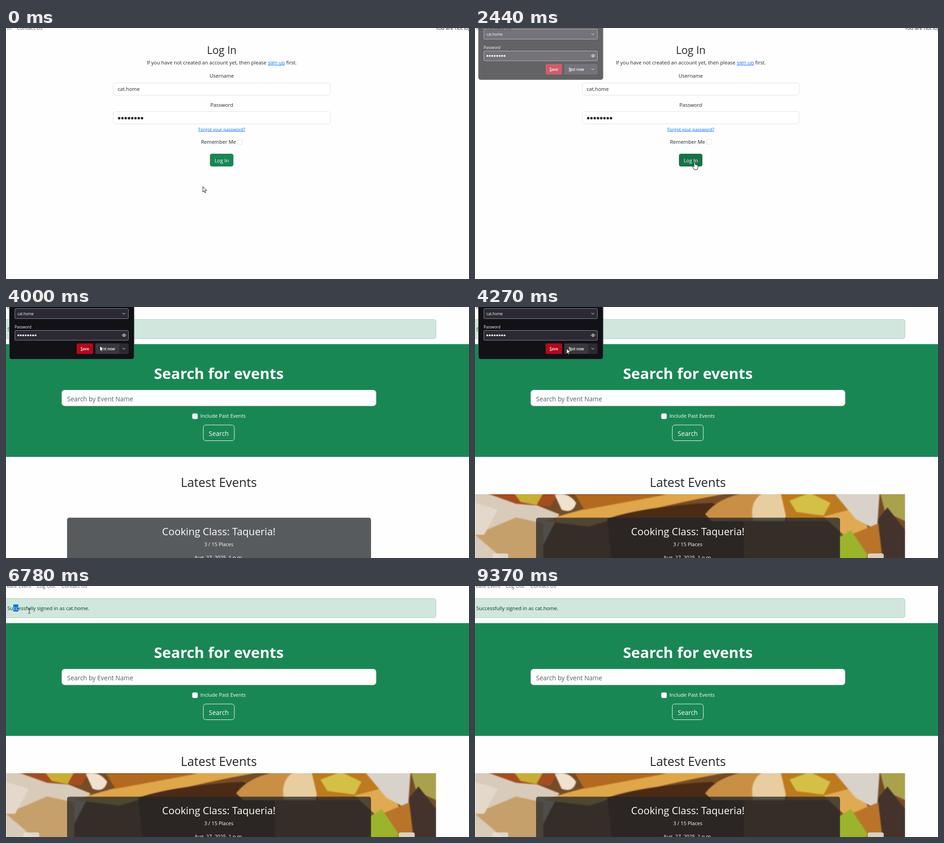
These frames come from a looping animation (1016 by 551 pixels, 9.87 s). An HTML page:

```html
<!DOCTYPE html>
<html lang="en">
<head>
<meta charset="utf-8">
<title>Log in walkthrough</title>
<style>
  html, body { margin: 0; width: 100%; height: 100%; overflow: hidden; background: #fefefe; }
  svg { display: block; width: 100%; height: 100%; font: 11.1px "Open Sans", "Noto Sans", sans-serif; fill: #212529; }
  .mid { text-anchor: middle; }
  .link { fill: #0d6efd; text-decoration: underline; }
  .nav { fill: #5c5d5f; }
  .field { fill: #fff; stroke: #dee2e6; }
  .white { fill: #fff; }
  .large { font-size: 13.95px; }
  #popup { font-size: 8.2px; fill: #fbfbfe; }
  #popup .box { fill: #2b2a33; stroke: #8f8f9d; }
  #popup .bold { font-weight: 600; }
  .icon { fill: none; stroke: #fbfbfe; }
  .underline { text-decoration: underline; }
  #photo { filter: blur(1.2px); }
  #cursor path { fill: #fff; stroke: #000; stroke-width: .9; stroke-linejoin: round; }
  #cursor #beam { fill: none; stroke: #222; stroke-width: 1; }
</style>
</head>
<body>
<svg viewBox="0 0 1016 551">
  <defs>
    <clipPath id="photoClip"><rect y="411" width="944" height="140"/></clipPath>
    <clipPath id="selectionClip"><rect class="selection" x="16" y="40.5" height="15.5"/></clipPath>
  </defs>

  <g id="login">
    <text class="nav" x="12" y="4" text-anchor="end">Log In</text>
    <text class="nav" x="24" y="4">Contact Us</text>
    <text x="943" y="4">You are not logged in</text>
    <text class="mid" x="473.5" y="56.5" font-size="23">Log In</text>
    <text class="mid" x="473.5" y="80">If you have not created an account yet, then please <tspan class="link">sign up</tspan> first.</text>
    <text class="mid" x="473.5" y="109">Username</text>
    <rect class="field" x="235.5" y="120.5" width="476" height="27" rx="4.5"/>
    <text x="245" y="138">cat.home</text>
    <text class="mid" x="473.5" y="172.5">Password</text>
    <rect class="field" x="235.5" y="183.5" width="476" height="27" rx="4.5"/>
    <g id="loginDots"></g>
    <text class="mid link" x="473.5" y="225.5" font-size="9.7">Forgot your password?</text>
    <text x="428" y="254">Remember Me</text>
    <rect class="field" x="507.5" y="244.5" width="11" height="11" rx="2.5"/>
    <rect id="loginButton" x="447.5" y="276" width="51.5" height="28" rx="4.5"/>
    <text class="mid white" x="473.5" y="294.5">Log In</text>
  </g>

  <g id="home">
    <text class="nav" x="56" y="4" text-anchor="end">Create Event</text>
    <text class="nav" x="68" y="4">Log Out</text>
    <text class="nav" x="122" y="4">Contact Us</text>
    <rect x="-20" y="27.5" width="963.5" height="42" rx="4.5" fill="#d1e7dd" stroke="#a3cfbb"/>
    <text x="3" y="52.5" fill="#0a3622">Successfully signed in as cat.home.</text>
    <rect class="selection" x="16" y="40.5" height="15.5" fill="#0078d7"/>
    <text class="white" x="3" y="52.5" clip-path="url(#selectionClip)">Successfully signed in as cat.home.</text>

    <rect y="81.5" width="1016" height="247.5" fill="#198754"/>
    <text class="mid white" x="467" y="157.5" font-size="32.9" font-weight="700">Search for events</text>
    <rect class="field" x="122.5" y="182.5" width="689.5" height="34.5" rx="6"/>
    <text class="large" x="134" y="206.5" fill="#595c5f">Search by Event Name</text>
    <rect class="field" x="409" y="234" width="11.5" height="11.5" rx="2.5"/>
    <text class="white" x="426.5" y="243">Include Past Events</text>
    <rect x="433" y="259" width="68" height="34.5" rx="5.5" fill="none" stroke="#fff"/>
    <text class="mid white large" x="467" y="283">Search</text>

    <text class="mid" x="467" y="394.5" font-size="27.2">Latest Events</text>
    <g id="slide" clip-path="url(#photoClip)">
      <g id="photo"></g>
      <rect x="38" y="541" width="35" height="20" rx="4" fill="#e6e0d8" opacity=".85"/>
      <rect x="862" y="541" width="35" height="20" rx="4" fill="#e6e0d8" opacity=".85"/>
    </g>
    <rect x="134" y="462.5" width="667" height="120" rx="5" fill="#212529" opacity=".75"/>
    <text class="mid white" x="467" y="500.5" font-size="22.1">Cooking Class: Taqueria!</text>
    <text class="mid white" x="467" y="525">3 / 15 Places</text>
    <text class="mid white" x="467" y="554">Aug. 27, 2025, 1 p.m.</text>
  </g>

  <g id="popup">
    <rect x="7.5" y="-20" width="273.5" height="134.5" rx="5" fill="#111116" stroke="#52525e"/>
    <rect class="box" x="19.5" y="3.5" width="249" height="22" rx="2"/>
    <text x="25" y="17.5">cat.home</text>
    <text x="19" y="46.7">Password</text>
    <rect class="box" x="19.5" y="51.5" width="249" height="21.5" rx="2"/>
    <g id="popupDots"></g>
    <path class="icon" d="M255.5 13l3 3 3-3M255.5 90l3 3 3-3"/>
    <path class="icon" d="M254.5 62q4.500-6 9 0q-4.500 6-9 0z"/>
    <circle cx="259" cy="62" r="1.5"/>
    <rect x="155" y="80" width="36" height="23" rx="2.500" fill="#b00b1c"/>
    <text class="mid bold" x="173" y="94.5"><tspan class="underline">S</tspan>ave</text>
    <rect x="196" y="80" width="73" height="23" rx="2.500" fill="#2b2a33"/>
    <rect id="notNow" x="196" y="80" width="52.500" height="23" rx="2.500"/>
    <text class="mid bold" x="222.5" y="94.5"><tspan class="underline">N</tspan>ot now</text>
    <path class="icon" d="M255.5 90l3 3 3-3"/>
  </g>

  <g id="cursor">
    <path id="arrow" d="M0 0V12L2.700 9.400 4.600 13.700 6.300 13 4.500 8.800H8.300Z"/>
    <path id="hand" d="M-1.300 1.400Q0-.6 1.300 1.400V6Q2.600 5 3.600 6.500Q5 5.700 5.700 7.200Q7.200 6.800 7.200 8.500V12L5.500 17H-1L-4.300 11.200Q-5.200 8.500-3.400 8.800L-1.300 10.700Z"/>
    <path id="beam" d="M-2.500-5.500H-.7L0-4.800.7-5.500H2.500M0-4.800V4.800M-2.500 5.500H-.7L0 4.800.7 5.500H2.500"/>
  </g>
</svg>
<script>
const LOOP = 9870;
const PAGE_CHANGE = 4000, PHOTO_LOADED = 4150;
const POPUP = { fadeIn: 2440, open: 2560, fadeOut: 4980, closed: 5100 };

const $ = id => document.getElementById(id);
const show = (id, on) => $(id).style.display = on ? "" : "none";
const inside = (p, x0, y0, x1, y1) => p.x >= x0 && p.x <= x1 && p.y >= y0 && p.y <= y1;

// Pointer moves: first step time, last step time, steps, destination x, y
const START = { x: 432, y: 348 };
const MOVES = [
  [120, 240, 2, 447, 341], [390, 880, 5, 483, 295], [1140, 1140, 1, 481, 294],
  [1390, 1390, 1, 482, 294], [2560, 2560, 1, 481, 293.5], [2810, 2810, 1, 478, 293],
  [3090, 3460, 4, 196, 82], [3600, 3720, 2, 206, 85], [4150, 4270, 2, 201, 91],
  [4410, 4410, 1, 230, 112], [4530, 4530, 1, 214, 136], [4680, 4680, 1, 215, 115],
  [4840, 4840, 1, 222, 98], [5350, 5350, 1, 220, 102], [5470, 5470, 1, 222, 94],
  [5620, 5980, 4, 52, 26], [6120, 6490, 4, 18.5, 45], [6780, 6780, 1, 51, 54.5],
  [6900, 7270, 4, 161.5, 49], [7790, 7920, 2, 181, 82], [8860, 9110, 3, 826, 445],
  [9250, 9250, 1, 998, 538], [9370, 9370, 1, 1100, 600]
];

function pointerAt(t) {
  let p = START;
  for (const [first, last, steps, x, y] of MOVES) {
    if (t < first) break;
    const gap = (last - first) / (steps - 1 || 1) || 1;
    const k = Math.min(1, (Math.floor((t - first) / gap + 1e-6) + 1) / steps);
    p = { x: p.x + (x - p.x) * k, y: p.y + (y - p.y) * k };
  }
  return p;
}

function popupOpacity(t) {
  if (t < POPUP.fadeIn || t >= POPUP.closed) return 0;
  if (t < POPUP.open) return .65;
  return t < POPUP.fadeOut ? 1 : .5;
}

function selectionEnd(t, x) {
  if (t < 6780 || t >= 8440) return 16;
  return t < 6900 ? 27 : Math.min(157, x);
}

function dots(id, x, y, pitch, r) {
  $(id).innerHTML = Array.from({ length: 8 }, (_, i) =>
    `<circle cx="${x + i * pitch}" cy="${y}" r="${r}"/>`).join("");
}

// Soft flat shapes in the tones of a plate of food
const FOOD = [
  ["#754c26", "M0 405H944V560H0Z"],
  ["#d9cbb9", "M0 405H60L185 455 130 560H0Z"],
  ["#c6a06a", "M0 500L90 462 150 475 150 560H70Z"],
  ["#e3d8ca", "M0 430L50 445 20 500H0Z"],
  ["#a44d20", "M15 405H185L165 438 90 432Z"],
  ["#f0e2cf", "M175 412Q205 405 222 430Q215 455 190 445Z"],
  ["#c7ae35", "M85 408H150L135 435 100 428Z"],
  ["#e0a64a", "M150 470Q300 420 470 405H580Q400 435 250 482Z"],
  ["#b36a1e", "M220 412H420L240 445Z"],
  ["#4b2b15", "M290 465Q370 438 520 430L590 465V560H300Z"],
  ["#c98f45", "M505 455Q535 415 610 405H650L610 470H520Z"],
  ["#e7cd9f", "M610 470Q600 420 640 405H668Q690 430 680 470Z"],
  ["#bd7a1f", "M670 405H830V470H685Z"],
  ["#d5c047", "M690 425L735 408 780 430 765 458 705 450Z"],
  ["#dfaa52", "M765 460L840 440 870 500 830 520Z"],
  ["#d8d2ca", "M785 405H888L882 490 835 465Z"],
  ["#a9a14c", "M888 405H944V470L900 450Z"],
  ["#43332c", "M885 465L905 440 944 490V560H880Z"],
  ["#b9742a", "M825 500L885 475 895 560H840Z"],
  ["#9cb42c", "M800 505L825 490 862 545 850 560H800Z"]
];
$("photo").innerHTML = FOOD.map(([fill, d]) => `<path fill="${fill}" d="${d}"/>`).join("");
dots("loginDots", 248.4, 198, 7.15, 2.7);
dots("popupDots", 27, 62.3, 5.4, 2);

function draw(t) {
  const p = pointerAt(t), home = t >= PAGE_CHANGE;
  show("login", !home);
  show("home", home);
  show("slide", t >= PHOTO_LOADED);

  const opacity = popupOpacity(t);
  show("popup", opacity > 0);
  $("popup").setAttribute("opacity", opacity);
  $("popup").setAttribute("transform", `translate(0 ${opacity < 1 ? -1 : 0})`);
  $("notNow").setAttribute("fill", inside(p, 196, 80, 248, 103) ? "#38383f" : "#2b2a33");

  const overButton = !home && inside(p, 447, 276, 499, 304);
  const overText = home && inside(p, 0, 38, 183, 58);
  $("loginButton").setAttribute("fill", overButton ? "#157347" : "#198754");
  show("hand", overButton);
  show("beam", overText);
  show("arrow", !overButton && !overText);
  $("cursor").setAttribute("transform", `translate(${p.x} ${p.y})`);

  const width = selectionEnd(t, p.x) - 16;
  document.querySelectorAll(".selection").forEach(r => r.setAttribute("width", width));
}

function frame() {
  draw(performance.now() % LOOP);
  requestAnimationFrame(frame);
}
frame();
</script>
</body>
</html>
```
